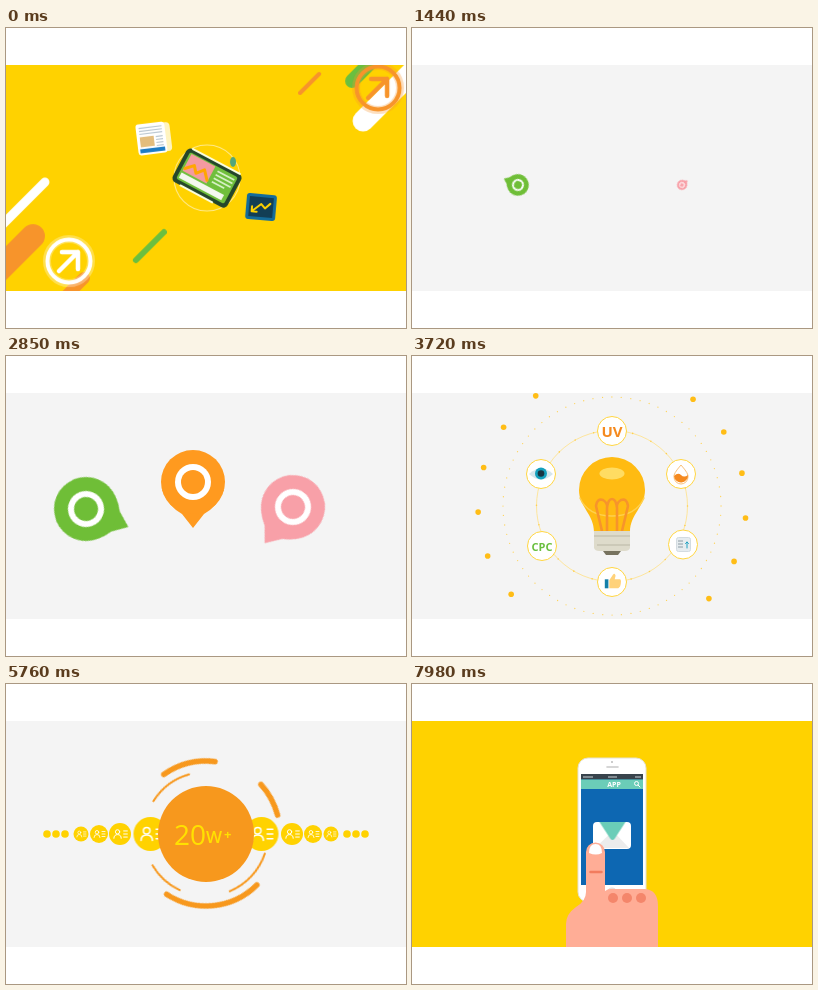
An HTML page for the animation above (8000 ms loop, 400 px wide and 300 px high).

```html
<!DOCTYPE html>
<html lang="en">
<head>
<meta charset="utf-8">
<title>Promo loop</title>
<style>
html, body { margin: 0; width: 100%; height: 100%; overflow: hidden; background: #fff; }
svg { display: block; width: 100%; height: 100%; font-family: "Open Sans", "Noto Sans", sans-serif; }
.a { animation: 8s linear infinite both; }
.ln { fill: none; stroke-linecap: round; stroke-linejoin: round; }

/* scene switches */
.opening { animation-name: opening; }
@keyframes opening { 0%, 16.9% { visibility: visible; } 17%, 100% { visibility: hidden; } }
.ending { animation-name: ending; }
@keyframes ending { 0%, 80.9% { visibility: hidden; } 81%, 100% { visibility: visible; } }

/* opening */
.slide { animation-name: slide; animation-timing-function: ease-out; }
@keyframes slide { 0% { transform: none; } 11%, 100% { transform: translate(var(--d), calc(-1 * var(--d))); } }
.devices { animation-name: devices; }
@keyframes devices {
  0% { transform: none; animation-timing-function: ease-out; }
  6% { transform: rotate(8deg) scale(1.2); }
  11% { transform: rotate(12deg) scale(1.2); animation-timing-function: ease-in; }
  16%, 100% { transform: rotate(60deg) scale(0); }
}
.wipe { animation-name: wipe; animation-timing-function: ease-in; }
@keyframes wipe { 0%, 12% { transform: scale(0); } 16.5%, 100% { transform: scale(1); } }

/* pins */
.green { animation-name: green; }
@keyframes green {
  0%, 17.2% { transform: translate(106px, 157px) rotate(150deg) scale(0); }
  18% { transform: translate(106px, 157px) rotate(115deg) scale(.33); animation-timing-function: ease-out; }
  21% { transform: translate(106px, 157px) rotate(-12deg) scale(1.1); }
  23%, 32.5% { transform: translate(106px, 157px); animation-timing-function: ease-in-out; }
  35.625% { transform: translate(80px, 153px) rotate(-67deg); animation-timing-function: ease-in; }
  38.5%, 100% { transform: translate(200px, 150px) rotate(-200deg) scale(0); }
}
.pink { animation-name: pink; }
@keyframes pink {
  0%, 17.5% { transform: translate(270px, 157px) rotate(-160deg) scale(0); }
  18% { transform: translate(270px, 157px) rotate(-130deg) scale(.15); animation-timing-function: ease-out; }
  21.5% { transform: translate(270px, 157px) rotate(12deg) scale(1.1); }
  23.5%, 33% { transform: translate(270px, 157px); animation-timing-function: ease-in-out; }
  35.625% { transform: translate(287px, 151px) rotate(38deg); animation-timing-function: ease-in; }
  39%, 100% { transform: translate(200px, 150px) rotate(200deg) scale(0); }
}
.orange { animation-name: orange; }
@keyframes orange {
  0%, 19% { transform: translate(187px, 126px) scale(0); animation-timing-function: ease-out; }
  22% { transform: translate(187px, 126px) scale(1.08); }
  24%, 36% { transform: translate(187px, 126px); animation-timing-function: ease-in; }
  39%, 100% { transform: translate(200px, 150px) scale(0); }
}

/* bulb */
.bulb { animation-name: bulb; }
@keyframes bulb {
  0%, 38% { transform: scale(0); animation-timing-function: ease-out; }
  40.5% { transform: scale(1.1); }
  42%, 53% { transform: none; animation-timing-function: ease-in; }
  56%, 100% { transform: scale(0); }
}
.orbit { animation-name: orbit; }
@keyframes orbit {
  0%, 38.5% { transform: scale(0); animation-timing-function: ease-out; }
  42.5%, 51.5% { transform: none; animation-timing-function: ease-in; }
  55%, 100% { transform: scale(0); }
}
.burst { animation-name: burst; }
@keyframes burst {
  0%, 38.5% { transform: scale(0); animation-timing-function: ease-out; }
  42% { transform: scale(.95); }
  46.5% { transform: none; }
  51% { transform: scale(1.06); animation-timing-function: ease-in; }
  54.5%, 100% { transform: scale(0); }
}

/* counter */
.disc { animation-name: disc; }
@keyframes disc {
  0%, 55% { transform: scale(0); animation-timing-function: ease-out; }
  58.5% { transform: scale(1.06); }
  60%, 80.5% { transform: none; }
  82.5% { transform: scale(.84); animation-timing-function: ease-in; }
  85.5%, 100% { transform: scale(0); }
}
.rings { animation-name: rings; }
@keyframes rings {
  0%, 57% { transform: scale(0); animation-timing-function: ease-out; }
  61%, 80.5% { transform: none; }
  82.5% { transform: scale(.86); animation-timing-function: ease-in; }
  85.5%, 100% { transform: scale(0); }
}
.arc { animation-name: arc; }
@keyframes arc {
  0%, 57% { transform: rotate(calc(var(--a0) - 70deg)); stroke-dasharray: 1 360; animation-timing-function: ease-out; }
  63% { transform: rotate(var(--a0)); stroke-dasharray: var(--l0) 360; }
  82.5%, 100% { transform: rotate(var(--a1)); stroke-dasharray: var(--l1) 360; }
}
.row { animation-name: row; }
@keyframes row {
  0%, 60% { transform: scale(0); }
  60.1%, 81% { transform: none; }
  82.5% { transform: scale(.91); animation-timing-function: ease-in; }
  85%, 100% { transform: scale(0); }
}
.badge { animation-name: badge; }
@keyframes badge {
  0%, 61% { transform: none; animation-timing-function: ease-out; }
  63%, 100% { transform: translate(var(--x), 0); }
}
.label { animation-name: label; }
@keyframes label {
  0%, 58.5% { transform: scale(0); animation-timing-function: ease-out; }
  60.5%, 82.5% { transform: none; animation-timing-function: ease-in; }
  85%, 100% { transform: scale(0); }
}
.unit { animation-name: unit; }
@keyframes unit { 0%, 63% { transform: translateY(2px) scale(1.1, 1.65); opacity: .7; } 66%, 100% { transform: none; opacity: 1; } }
.plus { animation-name: plus; }
@keyframes plus { 0%, 81% { opacity: 1; } 82%, 100% { opacity: 0; } }

/* envelope and phone */
.panel { animation-name: panel; }
@keyframes panel {
  0%, 81% { transform: none; }
  82.5% { transform: scale(.96, .995); }
  85.5% { transform: scale(.86, .92); animation-timing-function: ease-in-out; }
  90% { transform: scale(.095, .12); }
  90.1%, 100% { transform: scale(0); }
}
.fold { animation-name: fold; }
@keyframes fold {
  0%, 80% { transform: scale(0); }
  82.5% { transform: scale(.13); animation-timing-function: ease-out; }
  86%, 100% { transform: none; }
}
.phone { animation-name: phone; }
@keyframes phone {
  0%, 86% { transform: translateY(200px); animation-timing-function: ease-out; }
  90.5%, 100% { transform: none; }
}
.mail { animation-name: mail; }
@keyframes mail { 0%, 89.9% { opacity: 0; } 90%, 100% { opacity: 1; } }
.flap { animation-name: flap; }
@keyframes flap { 0%, 90% { transform: scaleY(0); } 91.5%, 100% { transform: none; } }
.hand { animation-name: hand; }
@keyframes hand {
  0%, 92% { transform: translate(-250px, 70px); animation-timing-function: ease-out; }
  98%, 100% { transform: none; }
}
</style>
</head>
<body>
<svg viewBox="0 0 400 300">
  <defs>
    <g id="pin">
      <path d="M-31 8Q-24 25-11 32L0 46 11 32Q24 25 31 8Z"/>
      <circle r="32"/>
      <circle r="18" fill="#fff"/>
      <circle r="12"/>
    </g>
    <g id="arrow" class="ln">
      <circle r="22" stroke-width="8" opacity=".3"/>
      <circle r="21.5" stroke-width="4"/>
      <path d="M-10 10 9-9M-7-9H9V8" stroke-width="4.5"/>
    </g>
    <g id="person" class="ln" stroke="#fff" stroke-width="1.6">
      <circle cx="-4" cy="-3.5" r="3.5"/>
      <path d="M-10 7Q-10 1-4 1T2 7M6-5H12M6 0H12M6 5H12"/>
    </g>
  </defs>

  <rect y="37" width="400" height="226" fill="#f4f4f4"/>

  <g class="a opening">
    <rect y="37" width="400" height="226" fill="#ffd200"/>
    <g class="ln">
      <g class="a slide" style="--d:-34px">
        <path d="M-20 213 39 154" stroke="#fff" stroke-width="9"/>
        <path d="M-30 265 27 208" stroke="#f7942b" stroke-width="24"/>
        <path d="M58 270 78 250" stroke="#f7942b" stroke-width="12"/>
        <path d="M130 232 158 204" stroke="#6abf3f" stroke-width="6"/>
        <use href="#arrow" x="63" y="233" stroke="#fff"/>
      </g>
      <g class="a slide" style="--d:34px">
        <path d="M294 65 313 46" stroke="#f7942b" stroke-width="4"/>
        <path d="M346 53 372 27" stroke="#6abf3f" stroke-width="14"/>
        <path d="M357 93 415 35" stroke="#fff" stroke-width="21"/>
        <use href="#arrow" x="372" y="60" stroke="#f7942b"/>
      </g>
    </g>
    <g transform="translate(201 150)"><g class="a devices">
      <circle r="33" fill="none" stroke="#ffe98a"/>
      <ellipse cx="26" cy="-16" rx="3" ry="5" fill="#53a67a"/>
      <g transform="translate(-55 -39) rotate(-7)">
        <rect x="-13" y="-15" width="32" height="29" rx="4" fill="#fff4c0"/>
        <rect x="-15" y="-16" width="29" height="31" rx="3" fill="#fff"/>
        <path d="M-12-12H11M-12-9H11M-12-6H11M4-2H11M4 1H11M4 4H11M4 7H11" stroke="#b9c6d0" stroke-width="1.2"/>
        <rect x="-12" y="-3" width="14" height="10" fill="#e3bd7d"/>
        <path d="M-13 11H12" stroke="#1d7cc4" stroke-width="4"/>
      </g>
      <g transform="rotate(28)">
        <rect x="-31" y="-19" width="62" height="38" rx="5" fill="#24452a"/>
        <path class="ln" d="M-26-19H27M-20 19H16" stroke="#fbffe0" stroke-width="2"/>
        <rect x="-27" y="-15" width="54" height="30" rx="2" fill="#70bf3c"/>
        <rect x="-25" y="-14" width="27" height="19" fill="#f49aa0"/>
        <path class="ln" d="M-24 2-17-5-12 1-6-6 1 2" stroke="#ffa600" stroke-width="3"/>
        <path d="M6-11H25M6-7H25M6-3H25M6 1H20" stroke="#d9f1c8" stroke-width="1.7"/>
        <path d="M-25 10H23" stroke="#f4f8ef" stroke-width="6"/>
      </g>
      <g transform="translate(54 29) rotate(5)">
        <rect x="-15" y="-13" width="30" height="26" rx="3" fill="#146c9a"/>
        <rect x="-12" y="-10" width="24" height="20" fill="#123e55"/>
        <path class="ln" d="M9-4 4 1 0-3-9 5M-9 0V5H-4" stroke="#ffd200" stroke-width="2"/>
      </g>
    </g></g>
    <g transform="translate(200 150)"><circle class="a wipe" r="235" fill="#f4f4f4"/></g>
  </g>

  <use class="a green" href="#pin" fill="#6fbe37"/>
  <use class="a pink" href="#pin" fill="#f8a0a8"/>
  <use class="a orange" href="#pin" fill="#ff9a1f"/>

  <g transform="translate(200 150)">
    <g class="a burst">
      <circle class="ln" r="109" stroke="#ffd45c" stroke-width="1.3" stroke-dasharray="0 9.5"/>
      <g id="sparks" fill="#ffbd16"></g>
    </g>
    <g class="a orbit">
      <circle r="75.5" fill="none" stroke="#ffe187" stroke-width=".8"/>
      <circle class="ln" r="75.5" stroke="#ffcf4d" stroke-width="1.6" stroke-dasharray="0 19.8"/>
      <g fill="#fff" stroke="#ffd540">
        <circle cy="-75" r="14.5"/><circle cx="-71" cy="-32" r="14.5"/><circle cx="69" cy="-32" r="14.5"/>
        <circle cx="-70" cy="40" r="14.5"/><circle cx="71" cy="38.500" r="14.5"/><circle cy="76" r="14.5"/>
      </g>
      <g text-anchor="middle" font-weight="700">
        <text y="-69.500" font-size="15" fill="#f58a1f">UV</text>
        <text x="-70" y="44.5" font-size="11" fill="#6abf3f">CPC</text>
      </g>
      <path d="M-83-32Q-71-43-59-32-71-21-83-32Z" fill="#d6e6ec"/>
      <circle cx="-71" cy="-32.500" r="6" fill="#15a0bd"/><circle cx="-71" cy="-32.500" r="3.3" fill="#193542"/>
      <path d="M69-41Q61-32 62-29A7 7 0 0 0 76-29Q77-32 69-41Z" fill="#fff" stroke="#f9c07a"/>
      <path d="M62-30Q66-34 69-31T76-31A7 7 0 0 1 62-30Z" fill="#f58a1f"/>
      <rect x="64.500" y="31.500" width="14" height="14" rx="2" fill="#e6ecef" stroke="#d3dbe0"/>
      <path d="M66 35H71M66 38H71M66 41H71" stroke="#8c9ba3"/>
      <path class="ln" d="M75 42V36M73.500 37.500 75 36 76.500 37.500" stroke="#20a0c0"/>
      <g transform="translate(0 76) scale(.9)">
        <rect x="-8" y="-3" width="4" height="10" fill="#147fa8"/>
        <path d="M-3-2 1-8Q3-11 4-7L3-3H9Q11-2 9 5L7 7H-3Z" fill="#ffd27a"/>
      </g>
    </g>
    <g class="a bulb">
      <path d="M-33-16A33 33 0 0 1 33-16C33 1 18 8 18 26H-18C-18 8-33 1-33-16Z" fill="#ffbb12"/>
      <ellipse cy="-32.500" rx="12.500" ry="6" fill="#ffdc62"/>
      <path class="ln" d="M-32-8Q-24 10 0 10T32-8" stroke="#ffd04d" stroke-width="1.5"/>
      <path class="ln" d="M-10 25-16 0Q-15-8-9-6-4-3-5 2-4-7 0-7T5 2Q4-3 9-6 15-8 16 0L10 25M-5 2V25M5 2V25" stroke="#f7942b" stroke-width="2.6"/>
      <path d="M-18 25H18V42Q17 45 13 45H-13Q-17 45-18 42Z" fill="#dedbcb"/>
      <path d="M-18 30H18M-15 39H18" stroke="#c6c3b2" stroke-width="1.5"/>
      <path d="M-9 45H9L6 49H-6Z" fill="#77735f"/>
    </g>
  </g>

  <g class="a ending">
    <rect y="37" width="400" height="226" fill="#ffd200"/>
    <g class="a phone">
      <rect x="166" y="74" width="68" height="144" rx="10" fill="#fff" stroke="#e5e1d2"/>
      <path class="ln" d="M195 83H206" stroke="#c9c9c9" stroke-width="1.6"/>
      <circle cx="200" cy="78" r="1" fill="#bbb"/>
      <rect x="169" y="90" width="62" height="111" fill="#0d67b2"/>
      <rect x="169" y="90" width="62" height="5.5" fill="#38434c"/>
      <path d="M171 93H181M196 93H205M223 93H229" stroke="#ccd3d7"/>
      <rect x="169" y="95.5" width="62" height="9.5" fill="#6bcdb8"/>
      <text x="202" y="103" text-anchor="middle" font-size="7" font-weight="700" fill="#fff">APP</text>
      <path class="ln" d="M226 101 228 103" stroke="#fff"/>
      <circle cx="224.5" cy="99.5" r="2" fill="none" stroke="#fff"/>
      <circle cx="200" cy="209" r="5" fill="none" stroke="#ddd"/>
    </g>
    <g transform="translate(200 150)"><g class="a panel">
      <rect x="-200" y="-113" width="400" height="226" rx="6" fill="#f4f4f4"/>
      <g transform="translate(0 113)"><path class="a fold" d="M-100 0-7-103Q0-110 7-103L100 0Z" fill="#c9c9c9"/></g>
    </g></g>
    <g class="a mail">
      <rect x="181" y="138" width="38" height="27" rx="4" fill="#fff"/>
      <path d="M183 164 201 147 217 164Z" fill="#ececec"/>
      <g transform="translate(200.5 138)"><path class="a flap" d="M-13 0H13L2 17Q0 19-2 17Z" fill="#6bcdb8"/></g>
    </g>
  </g>

  <g transform="translate(200 150)">
    <g class="a rings" id="rings"></g>
    <g class="a row" id="row"></g>
    <circle class="a disc" r="48" fill="#f7981d"/>
    <g class="a label" fill="#ffe100">
      <text id="count" x="-32" y="11" font-size="28">20</text>
      <g transform="translate(0 8.5)"><text class="a unit" font-size="17" font-weight="600">W</text></g>
      <text class="a plus" x="18" y="5" font-size="13" font-weight="700">+</text>
    </g>
  </g>

  <g class="a hand">
    <path d="M174 168A9.5 9.5 0 0 1 193 168V207Q197 204 203 205H233Q246 206 246 222V270H154V240Q154 230 164 223Q174 217 174 208Z" fill="#ffad96"/>
    <path d="M177 169Q177 160 183.5 160T190 169Q184 172 177 169Z" fill="#fff"/>
    <path class="ln" d="M178.5 188H189.5" stroke="#f27c5e" stroke-width="2.5"/>
    <g fill="#f4866b"><circle cx="201" cy="214" r="5"/><circle cx="215" cy="214" r="5"/><circle cx="229" cy="214" r="5"/></g>
  </g>

  <path d="M0 0H400V37H0ZM0 263H400V300H0Z" fill="#fff"/>
</svg>
<script>
const $ = id => document.getElementById(id);

// Two fans of sparks, left and right
for (const start of [177.4, 5.1])
  for (let k = -3; k <= 3; k++) {
    const a = (start + 19.3 * k) * Math.PI / 180;
    $('sparks').innerHTML += `<circle cx="${134 * Math.cos(a)}" cy="${134 * Math.sin(a)}" r="2.8"/>`;
  }

// radius, width, first angle and length, last angle and length
const arcs = [
  [73, 5.5, -123, 47, -128, 37], [74, 5.5, -43, 31, -41, 23], [72, 5.5, 39, 104, 52, 48],
  [62, 2, -160, 49, -134, 34], [62, 2, 116, 35, 114, 34], [62, 2, 24, 48, 12, 50]
];
$('rings').innerHTML = arcs.map(([r, w, a0, l0, a1, l1]) =>
  `<circle class="a arc ln" r="${r}" pathLength="360" stroke="#f7981d" stroke-width="${w}"
    style="--a0:${a0}deg;--l0:${l0};--a1:${a1}deg;--l1:${l1}"/>`).join('');

// distance and radius of the badges, outermost painted first
const badges = [[55.5, 17], [86, 11], [107, 9], [125, 7.5], [141, 3.8], [150, 3.8], [159, 3.8]];
$('row').innerHTML = badges.map(([x, r], i) => [-x, x].map(d =>
  `<g class="a badge" style="--x:${d}px;animation-delay:${i * 90 + (i && 60)}ms">
    <circle r="${r}" fill="#ffd200"/>
    ${r > 5 ? `<use href="#person" transform="scale(${r / 18})"/>` : ''}</g>`).join('')).reverse().join('');

// Spinning digits that settle
const clock = document.querySelector('.label').getAnimations()[0];
function tick() {
  const t = (clock.currentTime || 0) % 8000;
  const step = Math.floor((t - 5010) / 60);
  $('count').textContent = t > 5640 ? 20 : 10 + (63 + ((step * 37) % 90) + 90) % 90;
  requestAnimationFrame(tick);
}
tick();
</script>
</body>
</html>
```
